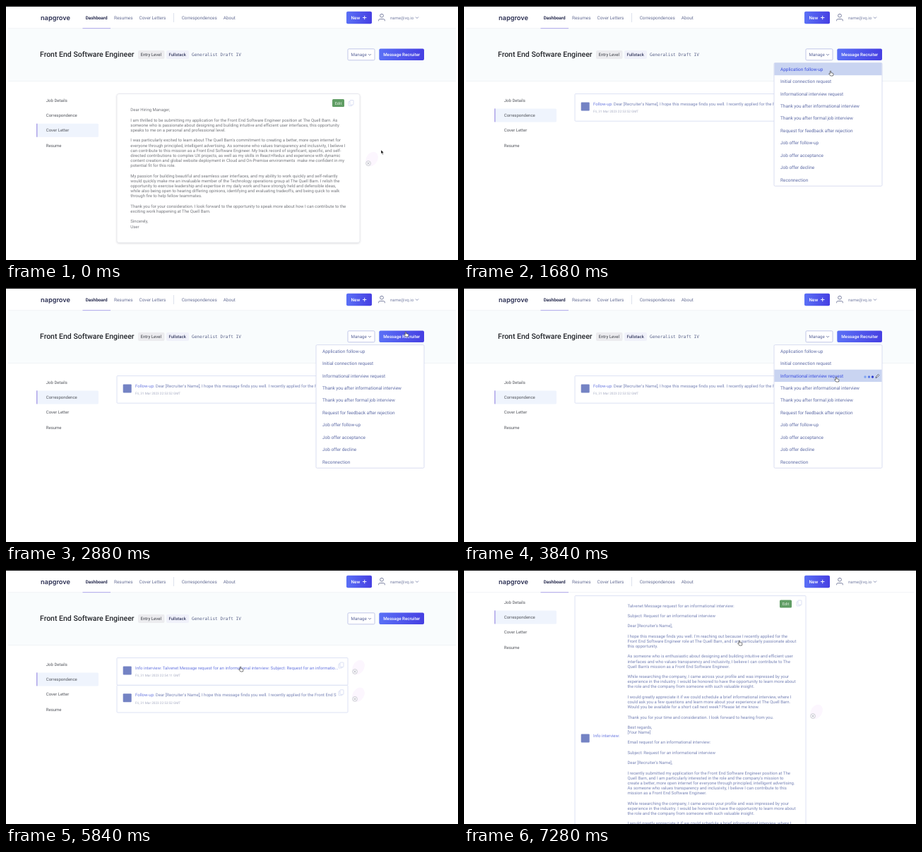
An HTML page that plays this animation: 640 by 360 pixels, repeating every 7360 ms.

```html
<!DOCTYPE html>
<html lang="en">
<head>
<meta charset="utf-8">
<title>Job application dashboard</title>
<style>
html, body { margin: 0; width: 100%; height: 100%; overflow: hidden; background: #fff; }
svg { display: block; width: 100vw; height: 100vh; }
text { font-family: Roboto, Arial, sans-serif; white-space: pre; text-rendering: geometricPrecision; }
</style>
</head>
<body>
<svg id="stage" viewBox="0 0 640 360">
  <defs>
    <linearGradient id="button"><stop stop-color="#5a70f6"/><stop offset="1" stop-color="#463fe2"/></linearGradient>
    <filter id="shadow" x="-5%" y="-5%" width="110%" height="112%">
      <feDropShadow dx="0" dy=".8" stdDeviation=".9" flood-color="#445" flood-opacity=".2"/>
    </filter>
  </defs>
</svg>
<script>
const LOOP = 7360, STEP = 80;
const INK = '#54575e', SLATE = '#5f6ca6', PALE = '#7884b6', INDIGO = '#6b7ae0', NAVY = '#2b2f52', LINE = '#dadff3';
const stage = document.getElementById('stage');

function node(parent, tag, attrs, content) {
  const el = document.createElementNS('http://www.w3.org/2000/svg', tag);
  for (const key in attrs) el.setAttribute(key, attrs[key]);
  if (content !== undefined) el.textContent = content;
  return parent.appendChild(el);
}
const group = (parent, x = 0, y = 0) => node(parent, 'g', { transform: `translate(${x} ${y})` });
const rect = (parent, x, y, width, height, fill, more) =>
  node(parent, 'rect', { x, y, width, height, fill, ...more });
const path = (parent, d, stroke, more) =>
  node(parent, 'path', { d, stroke, fill: 'none', 'stroke-width': .8, ...more });
// y is the visual middle of the line
const label = (parent, x, y, size, fill, content, more) =>
  node(parent, 'text', { x, y: y + size * .35, 'font-size': size, fill, ...more }, content);
const show = (el, on) => el.setAttribute('visibility', on ? 'inherit' : 'hidden');
const moveTo = (el, x, y) => el.setAttribute('transform', `translate(${x} ${y})`);

const MEDIUM = { 'font-weight': 500 };
const BODY = 6, PITCH = 7.18;

function paragraphs(parent, x, y, fill, content) {
  content.trim().split('\n').forEach((line, i) => label(parent, x, y + i * PITCH, BODY, fill, line));
}
function chevron(parent, x, y) {
  path(parent, `M${x - 2} ${y - 1}l2 2 2-2`, '#69739f');
}
function copyIcon(parent, x, y) {
  rect(parent, x - 3.5, y - 2, 5, 6, '#fff', { stroke: '#cdd4ef', 'stroke-width': .7, rx: .6 });
  rect(parent, x - 1.5, y - 4, 5, 6.5, '#fff', { stroke: '#cdd4ef', 'stroke-width': .7, rx: .6 });
}
function deleteIcon(parent, x, y) {
  node(parent, 'ellipse', { cx: 5, cy: -6, rx: 8, ry: 11, fill: '#fcf6fe', transform: `translate(${x} ${y}) rotate(30 5 -6)` });
  node(parent, 'circle', { cx: x, cy: y, r: 3.5, fill: '#f5f5f7', stroke: '#c4c4cd', 'stroke-width': .7 });
  path(parent, `M${x - 1.5} ${y - 1.5}l3 3m0-3l-3 3`, '#b4b4bf', { 'stroke-width': .7 });
}
function editButton(parent, x, y) {
  rect(parent, x, y, 17, 11, '#609d64', { rx: 1.5 });
  label(parent, x + 8.5, y + 5.6, 5.7, '#e3efe3', 'Edit', { 'text-anchor': 'middle' });
}
const badge = (parent, x, y) => rect(parent, x, y, 12, 12, '#7483c4', { rx: 1 });

const page = group(stage);

// Title band
rect(page, 3, 32, 634, 75, '#f9fcfd');
rect(page, 3, 106, 634, .7, '#ebeff4');
label(page, 48, 68.8, 10.5, '#24262b', 'Front End Software Engineer', MEDIUM);
rect(page, 187, 63, 37.5, 12, '#ececef', { rx: 2 });
label(page, 190.5, 69, 6.1, '#3c3f47', 'Entry Level');
rect(page, 227, 63, 32, 12, '#f0f1fa', { rx: 2 });
label(page, 230.5, 69, 6, '#383d62', 'Fullstack', MEDIUM);
label(page, 263, 69, 6.12, '#5b638a', 'Generalist Draft IV', { style: 'font-family:"DejaVu Sans Mono",monospace' });
rect(page, 484, 60.8, 38, 16, '#fff', { rx: 1.5, stroke: '#b3b9e2', 'stroke-width': .8 });
label(page, 488.5, 69, 6.2, '#5d679b', 'Manage');
chevron(page, 515, 69);
rect(page, 528.3, 60.5, 63.7, 16.5, 'url(#button)', { rx: 2 });
label(page, 560.2, 69, 6.2, '#fff', 'Message Recruiter', { 'text-anchor': 'middle', ...MEDIUM });

// Side navigation
const marker = group(page);
rect(marker, 43, -9.5, 88, 19, '#eff4fd', { rx: 1.5 });
rect(marker, 43, -9.5, 1.5, 19, '#aea4e8');
['Job Details', 'Correspondence', 'Cover Letter', 'Resume'].forEach((name, i) =>
  label(page, 56.8, 133.5 + i * 21.4, 6, INK, name));

// Cover letter
const letter = group(page);
deleteIcon(letter, 513, 223);
rect(letter, 157, 124.5, 344, 211, '#fff', { rx: 3, stroke: '#e1e3e9', 'stroke-width': .7, filter: 'url(#shadow)' });
editButton(letter, 462, 132);
copyIcon(letter, 488.5, 137.5);
paragraphs(letter, 176.3, 147.3, '#76787e', `
Dear Hiring Manager,

I am thrilled to be submitting my application for the Front End Software Engineer position at The Quell Barn. As
someone who is passionate about designing and building intuitive and efficient user interfaces, this opportunity
speaks to me on a personal and professional level.

I was particularly excited to learn about The Quell Barn's commitment to creating a better, more open internet for
everyone through principled, intelligent advertising. As someone who values transparency and inclusivity, I believe I
can contribute to this mission as a Front End Software Engineer. My track record of significant, specific, and self-
directed contributions to complex UX projects, as well as my skills in React+Redux and experience with dynamic
content creation and global website deployment in Cloud and On-Premise environments  make me confident in my
potential fit for this role.

My passion for building beautiful and seamless user interfaces, and my ability to work quickly and self-reliantly
would quickly make me an invaluable member of the Technology operations group at The Quell Barn. I relish the
opportunity to exercise leadership and expertise in my daily work and have strongly held and defensible ideas,
while also being open to hearing differing opinions, identifying and evaluating tradeoffs, and being quick to walk
through fire to help fellow teammates.

Thank you for your consideration. I look forward to the opportunity to speak more about how I can contribute to the
exciting work happening at The Quell Barn.

Sincerely,
User`);

// Message list
function messageRow(kind, body, bodyFill, date) {
  const row = group(page);
  deleteIcon(row, 494, 144);
  rect(row, 157, 124.5, 327, 38.7, '#fff', { stroke: LINE, 'stroke-width': .9, rx: 1 });
  badge(row, 165.7, 136.5);
  const line = label(row, 183, 138.5, BODY, INDIGO, kind);
  node(line, 'tspan', { fill: bodyFill }, ' ' + body);
  label(row, 183, 149.5, 4.7, '#a9aec4', date);
  copyIcon(row, 474.5, 135);
  return row;
}
const followUp = messageRow('Follow-up:',
  "Dear [Recruiter's Name], I hope this message finds you well. I recently applied for the Front End S",
  PALE, 'Fri, 31 Mar 2023 22:53:52 GMT');
const interview = messageRow('Info interview:',
  'Talvenet Message request for an informational interview: Subject: Request for an informatio...',
  INDIGO, 'Fri, 31 Mar 2023 22:54:11 GMT');

// Opened message
const opened = group(page);
deleteIcon(opened, 494, 295);
rect(opened, 157, 124.5, 327, 402, '#fff', { stroke: LINE, 'stroke-width': .9, rx: 1 });
badge(opened, 165.7, 320.5);
label(opened, 183, 322.5, BODY, INDIGO, 'Info interview:');
editButton(opened, 447, 130.5);
copyIcon(opened, 474.5, 135);
const closing = `
While researching the company, I came across your profile and was impressed by your
experience in the industry. I would be honored to have the opportunity to learn more about
the role and the company from someone with such valuable insight.

I would greatly appreciate it if we could schedule a brief informational interview, where I
could ask you a few questions and learn more about your experience at The Quell Barn.
Would you be available for a short call next week? Please let me know.

Thank you for your time and consideration. I look forward to hearing from you.

Best regards,
[Your Name]
`;
const opening = `Subject: Request for an informational interview

Dear [Recruiter's Name],
`;
paragraphs(opened, 231.4, 138.5, PALE, `
Talvenet Message request for an informational interview:

${opening}
I hope this message finds you well. I'm reaching out because I recently applied for the
Front End Software Engineer role at The Quell Barn, and I am particularly passionate about
this opportunity.

As someone who is enthusiastic about designing and building intuitive and efficient user
interfaces and who values transparency and inclusivity, I believe I can contribute to The
Quell Barn's mission as a Front End Software Engineer.
${closing.trimEnd()}
Email request for an informational interview:

${opening}
I recently submitted my application for the Front End Software Engineer position at The
Quell Barn, and I am particularly interested in the role and the company's mission to
create a better, more open internet for everyone through principled, intelligent advertising.
As someone who values transparency and inclusivity, I believe I can contribute to this
mission as a Front End Software Engineer.
${closing}`.replace('[Your Name]\nEmail', '[Your Name]\n\nEmail'));

// Dropdown
const ROW = 17.42;
const menu = group(page);
rect(menu, 439, 80.6, 153, 174.6, '#fff', { stroke: '#d0d5ee', 'stroke-width': .8, rx: 1.5 });
const hover = group(menu);
rect(hover, 439.4, -8.7, 152.2, 17.4, '#c9d4f1');
const items = ['Application follow-up', 'Initial connection request', 'Informational interview request',
  'Thank you after informational interview', 'Thank you after formal job interview',
  'Request for feedback after rejection', 'Job offer follow-up', 'Job offer acceptance',
  'Job offer decline', 'Reconnection'
].map((name, i) => label(menu, 448, 89.5 + i * ROW, 6.45, SLATE, name));
const typing = group(menu);
const dots = [568, 573.5, 578.5].map(cx => node(typing, 'circle', { cx, cy: 1.6, r: 1.7 }));
path(typing, 'M583 3l.6-1.8 3-3.2 1.2 1.2-3 3.2z', '#30374f', { fill: '#fff' });

// Top bar
rect(stage, 0, 0, 640, 32, '#fff');
rect(stage, 0, 0, 640, 1, '#1b1b1d');
rect(stage, 3, 31.4, 634, .7, '#eceef4');
label(stage, 49, 16.3, 9.2, NAVY, 'napgrove', { 'font-weight': 600, style: 'font-family:Inter,sans-serif' });
label(stage, 112.7, 16.5, 6.4, NAVY, 'Dashboard', { 'font-weight': 700 });
rect(stage, 108.5, 31, 39.5, 1.2, '#b9b3ec');
[[153, 'Resumes'], [188.6, 'Cover Letters'], [248.7, 'Correspondences'], [307.8, 'About']]
  .forEach(([x, name]) => label(stage, x, 16.5, 6.4, '#666e95', name));
rect(stage, 237.2, 10, .7, 13, '#cfd4e6');
rect(stage, 482, 7.7, 36, 17.6, 'url(#button)', { rx: 2 });
label(stage, 488.5, 16.5, 6.4, '#fff', 'New', MEDIUM);
path(stage, 'M505 16.5h5.4m-2.7-2.7v5.4', '#fff', { 'stroke-width': .9 });
node(stage, 'circle', { cx: 532, cy: 13.7, r: 2.4, fill: 'none', stroke: '#5d658c', 'stroke-width': .8 });
path(stage, 'M527.6 21.3v-.8q0-2 2-2h4.8q2 0 2 2v.8', '#5d658c');
label(stage, 544, 16.5, 6, '#7a82a6', 'name@vq.io');
chevron(stage, 582, 16.5);

const thumb = rect(stage, 636, 0, 3, 255, '#85858a', { rx: 1.5 });

// Pointers, with the tip at the local origin
const arrow = group(stage);
path(arrow, 'M0 0v5.4l1.3-1.1 1 2.2 1-.5-1-2.1h1.7z', '#fff', { fill: '#000', 'stroke-width': .5 });
const hand = group(stage);
path(hand, 'M-.7.4q.7-.9 1.4 0v2.3l2.6.6q.9.3.7 1.3l-.6 2.4h-3.4l-2.2-2.6q-.2-1 .8-.7l.7.5z',
  '#222', { fill: '#fff', 'stroke-width': .6, 'stroke-linejoin': 'round' });

// Keys are [time, value, value...]; values ease between neighbours
const POINTER = [[0, 531, 204], [240, 556, 68], [400, 560, 68], [640, 520, 92], [1680, 519, 92],
  [2400, 556, 68], [2800, 566, 62], [2960, 566, 62], [3520, 527, 126], [5600, 527, 126],
  [5840, 332, 137], [6000, 332, 137], [6240, 336, 265], [6480, 336, 265], [6880, 390, 100]];
const SCROLL = [[6080, 0], [6320, 74], [6400, 74], [6560, 88]];

function at(keys, time) {
  const next = keys.findIndex(key => key[0] > time);
  if (next < 0) return keys[keys.length - 1].slice(1);
  if (next === 0) return keys[0].slice(1);
  const [from, to] = [keys[next - 1], keys[next]];
  const part = (time - from[0]) / (to[0] - from[0]);
  const eased = part * part * (3 - 2 * part);
  return from.slice(1).map((value, i) => value + (to[i + 1] - value) * eased);
}
const within = (time, start, end) => time >= start && time < end;

function render(time) {
  const [x, y] = at(POINTER, time);
  const [scroll] = at(SCROLL, time);
  const onLetter = time < 320;
  const isOpened = time >= 6000;
  const hasInterview = time >= 5680;

  moveTo(page, 0, -scroll);
  moveTo(marker, 0, onLetter ? 176.2 : 154.9);
  show(letter, onLetter);
  show(followUp, time >= 1600 && !isOpened);
  moveTo(followUp, 0, hasInterview ? 38.8 : 0);
  show(interview, hasInterview && !isOpened);
  show(opened, isOpened);

  show(menu, within(time, 320, 1760) || within(time, 2800, 5680));
  const row = x > 439 && x < 592 ? Math.floor((y + 2 - 80.8) / ROW) : -1;
  const hovering = row >= 0 && row < items.length;
  show(hover, hovering);
  if (hovering) moveTo(hover, 0, 89.5 + row * ROW);
  items.forEach((item, i) => item.setAttribute('fill', i === row ? '#3a4ee0' : SLATE));

  const first = within(time, 720, 1600);
  show(typing, first || within(time, 3680, 5680));
  moveTo(typing, 0, 89.5 + (first ? 0 : 2) * ROW);
  const beat = Math.floor(time / STEP);
  dots.forEach((dot, i) => dot.setAttribute('fill', ['#7fa3f0', '#5b7bea', '#3040d0'][(i + beat) % 3]));

  show(thumb, within(time, 6080, 7120));
  thumb.setAttribute('y', 50 + (scroll - 74) * .7);
  show(arrow, time < 160);
  show(hand, time >= 160);
  moveTo(arrow, x, y);
  moveTo(hand, x, y);

  // A visible child would otherwise show inside a hidden menu
  menu.setAttribute('display', menu.getAttribute('visibility') === 'hidden' ? 'none' : 'inline');
}

const start = performance.now();
function tick() {
  const time = (performance.now() - start) % LOOP;
  render(Math.floor(time / STEP) * STEP);
  requestAnimationFrame(tick);
}
tick();
</script>
</body>
</html>
```
